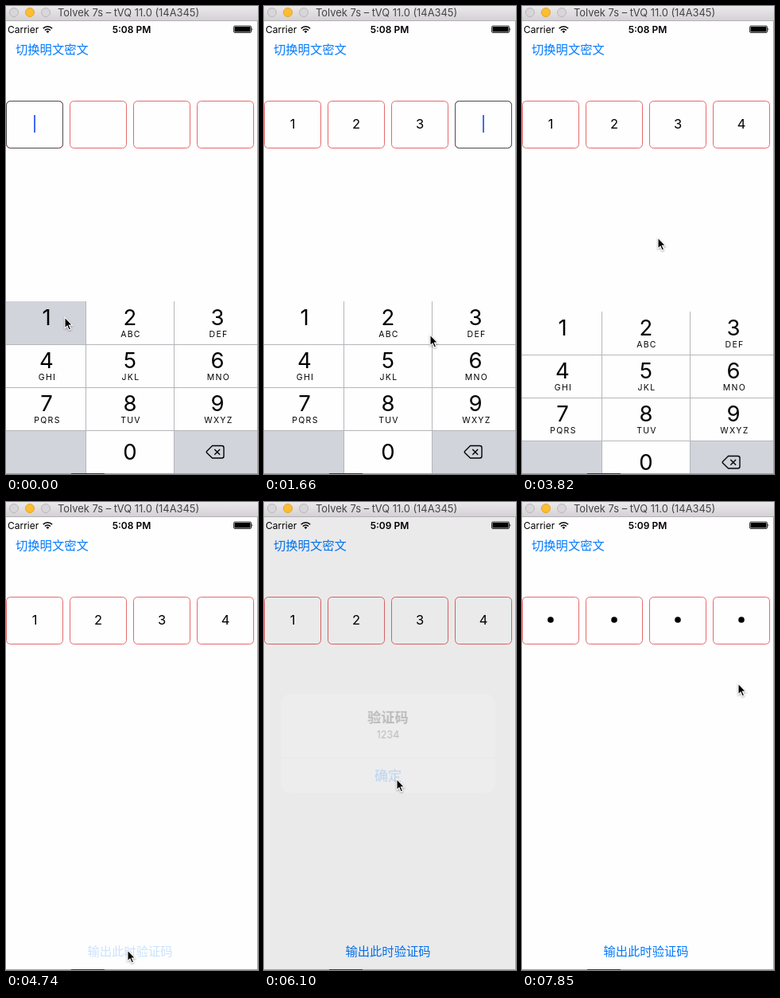
Recreate the animation shown at these times as an HTML page. Size 317 by 588 pixels, loop 8000 ms.

```html
<!DOCTYPE html>
<html lang="zh-CN">
<head>
<meta charset="utf-8">
<title>Code entry</title>
<style>
html, body { margin: 0; width: 100%; height: 100%; overflow: hidden; background: #fefefe; }
svg { display: block; width: 317px; height: 588px; }
text { font-family: Inter, "Noto Sans CJK SC", "Noto Sans CJK JP", "Noto Sans CJK", sans-serif; }
.mid { text-anchor: middle; }
.link { font-size: 15.3px; fill: #007aff; }
.box { fill: none; stroke: #e6686b; }
.active .box { stroke: #4c4c4e; }
.caret { fill: #426bf2; }
.digit { font-size: 16.5px; }
.num { font-size: 27.5px; }
.abc { font-size: 10.5px; letter-spacing: 1.3px; }
.line { stroke: #b4b6ba; fill: none; }
.grey { fill: #d1d4db; }

/* every animation shares the 8 s loop */
.hard, .soft { animation: 8s infinite both; }
.hard { animation-timing-function: step-end; }
.soft { animation-timing-function: linear; }

#key1 { animation-name: first; }
#key2 { animation-name: press2; }
#key3 { animation-name: press3; }
#key4 { animation-name: press4; }
#on1 { animation-name: first; }
#on2 { animation-name: second; }
#on3 { animation-name: third; }
#on4 { animation-name: fourth; }
#d1 { animation-name: digit1; }
#d2 { animation-name: digit2; }
#d3 { animation-name: digit3; }
#d4 { animation-name: digit4; }
#dots { animation-name: dots; }
#time1 { animation-name: before; }
#time2 { animation-name: after; }
#caretA { animation-name: caretA; }
#caretB { animation-name: caretB; }
#toggle { animation-name: toggle; }
#submit { animation-name: submit; }
#pad { animation-name: slide; }
#dim, #alert { animation-name: fade; }
#pop { animation-name: pop; transform-origin: 156px 303px; }
#pointer { animation-name: move; animation-timing-function: ease-in-out; }

@keyframes first { 0% { opacity: 1 } 3.75%, 100% { opacity: 0 } }
@keyframes second { 0% { opacity: 0 } 3.75% { opacity: 1 } 12.625%, 100% { opacity: 0 } }
@keyframes third { 0% { opacity: 0 } 12.625% { opacity: 1 } 20.75%, 100% { opacity: 0 } }
@keyframes fourth { 0% { opacity: 0 } 20.75% { opacity: 1 } 47.75%, 100% { opacity: 0 } }
@keyframes press2 { 0% { opacity: 0 } 8.875% { opacity: 1 } 12.625%, 100% { opacity: 0 } }
@keyframes press3 { 0% { opacity: 0 } 17% { opacity: 1 } 20.75%, 100% { opacity: 0 } }
@keyframes press4 { 0% { opacity: 0 } 27% { opacity: 1 } 28.5%, 100% { opacity: 0 } }
@keyframes digit1 { 0% { opacity: 0 } 3.75% { opacity: 1 } 90.125%, 100% { opacity: 0 } }
@keyframes digit2 { 0% { opacity: 0 } 12.625% { opacity: 1 } 90.125%, 100% { opacity: 0 } }
@keyframes digit3 { 0% { opacity: 0 } 20.75% { opacity: 1 } 90.125%, 100% { opacity: 0 } }
@keyframes digit4 { 0% { opacity: 0 } 28.5% { opacity: 1 } 90.125%, 100% { opacity: 0 } }
@keyframes dots { 0% { opacity: 0 } 90.125%, 100% { opacity: 1 } }
@keyframes before { 0% { opacity: 1 } 75.5%, 100% { opacity: 0 } }
@keyframes after { 0% { opacity: 0 } 75.5%, 100% { opacity: 1 } }
@keyframes caretA { 0% { opacity: 1 } 28.5%, 100% { opacity: 0 } }
@keyframes caretB {
  0%, 28.49% { opacity: 0 }
  28.5%, 34.5% { opacity: 1 }
  36.25%, 40% { opacity: 0 }
  41.75%, 100% { opacity: 1 }
}
@keyframes toggle {
  0%, 89.36% { opacity: 1 }
  89.375%, 90.1% { opacity: .2 }
  92.5%, 100% { opacity: 1 }
}
@keyframes submit {
  0%, 59.24% { opacity: 1 }
  59.25%, 62.99% { opacity: .2 }
  64.5%, 100% { opacity: 1 }
}
@keyframes slide {
  0%, 47.6% { transform: translateY(0); animation-timing-function: cubic-bezier(.3, .4, .3, 1) }
  51.5%, 100% { transform: translateY(217px) }
}
@keyframes fade {
  0%, 62.99% { opacity: 0 }
  63% { opacity: .35 }
  64.5%, 75.45% { opacity: 1 }
  75.5% { opacity: .6 }
  76.25%, 76.95% { opacity: .2 }
  77%, 100% { opacity: 0 }
}
@keyframes pop {
  0%, 63% { transform: scale(1.12) }
  64.5%, 100% { transform: scale(1) }
}
@keyframes move {
  0%, 3.7% { transform: translate(73px, 390px) }
  8.875%, 12.6% { transform: translate(160px, 398px) }
  17%, 20.7% { transform: translate(236px, 404px) }
  20.75%, 21.375% { transform: translate(208px, 412px) }
  27%, 33.7% { transform: translate(52px, 445px) }
  33.75%, 34.5% { transform: translate(74px, 442px) }
  37% { transform: translate(100px, 509px) }
  41.75%, 48.5% { transform: translate(170px, 290px) }
  57%, 67.4% { transform: translate(152px, 562px) }
  71.75%, 77% { transform: translate(166px, 347px) }
  84.25%, 84.8% { transform: translate(67px, 70px) }
  86.375%, 90.5% { transform: translate(63px, 51px) }
  95.125%, 97.3% { transform: translate(212px, 397px) }
  97.375%, 98.05% { transform: translate(240px, 322px) }
  98.125%, 100% { transform: translate(271px, 227px) }
}
</style>
</head>
<body>
<svg viewBox="0 0 317 588" xmlns="http://www.w3.org/2000/svg">
  <defs>
    <linearGradient id="chrome" x2="0" y2="1">
      <stop stop-color="#ebe9eb"/><stop offset="1" stop-color="#d2d0d2"/>
    </linearGradient>
    <rect id="frame" x=".5" y="119.5" width="71" height="59" rx="5"/>
    <rect id="bar" x="35" y="137" width="2" height="22"/>
  </defs>

  <rect width="317" height="588" fill="#fefefe"/>

  <!-- status bar -->
  <text x="2" y="33.5" font-size="12">Carrier</text>
  <g fill="none" stroke="#000" stroke-width="1.6">
    <path d="M46.7 28.2a8 8 0 0 1 11.4 0M48.9 30.5a5 5 0 0 1 7 0"/>
    <path d="M52.4 34l-1.9-2a2.8 2.8 0 0 1 3.8 0z" fill="#000" stroke="none"/>
  </g>
  <g class="mid" font-size="12" font-weight="600">
    <text id="time1" class="hard" x="158" y="33.5">5:08 PM</text>
    <text id="time2" class="hard" x="158" y="33.5">5:09 PM</text>
  </g>
  <rect x="286.5" y="25" width="22" height="8.5" rx="1.5" fill="none" stroke="#000" stroke-width=".8"/>
  <rect x="287.5" y="26" width="20" height="6.5" rx=".6"/>
  <path d="M309.5 27.6q1.8 1.6 0 3.3z"/>

  <text id="toggle" class="link soft" x="12" y="59.8">切换明文密文</text>
  <text id="submit" class="link mid soft" x="156" y="569.8">输出此时验证码</text>

  <!-- code boxes -->
  <g class="box">
    <use href="#frame"/><use href="#frame" x="80"/><use href="#frame" x="160"/><use href="#frame" x="240"/>
  </g>
  <g class="active">
    <g id="on1" class="hard"><use class="box" href="#frame"/><use class="caret" href="#bar"/></g>
    <g id="on2" class="hard"><use class="box" href="#frame" x="80"/><use class="caret" href="#bar" x="80"/></g>
    <g id="on3" class="hard"><use class="box" href="#frame" x="160"/><use class="caret" href="#bar" x="160"/></g>
    <g id="on4" class="hard">
      <use class="box" href="#frame" x="240"/>
      <g id="caretA" class="hard"><use class="caret" href="#bar" x="240"/></g>
      <g id="caretB" class="soft"><use class="caret" href="#bar" x="246"/></g>
    </g>
  </g>
  <g class="digit mid">
    <text id="d1" class="hard" x="36" y="154">1</text>
    <text id="d2" class="hard" x="116" y="154">2</text>
    <text id="d3" class="hard" x="196" y="154">3</text>
    <text id="d4" class="hard" x="276" y="154">4</text>
  </g>
  <g id="dots" class="hard">
    <circle cx="36" cy="148" r="3.8"/><circle cx="116" cy="148" r="3.8"/>
    <circle cx="196" cy="148" r="3.8"/><circle cx="276" cy="148" r="3.8"/>
  </g>

  <!-- number pad -->
  <g id="pad" class="soft">
    <rect y="371" width="317" height="217" fill="#fefefe"/>
    <g class="grey">
      <rect y="534" width="100" height="54"/>
      <rect x="212" y="534" width="105" height="54"/>
      <rect id="key1" class="hard" y="371" width="100" height="54"/>
      <rect id="key2" class="hard" x="101" y="371" width="110" height="54"/>
      <rect id="key3" class="hard" x="212" y="371" width="105" height="54"/>
      <rect id="key4" class="hard" y="426" width="100" height="53"/>
    </g>
    <path class="line" d="M100.5 371V588M211.5 371V588M0 425.5H317M0 479.5H317M0 533.5H317"/>
    <g class="num mid">
      <text x="51" y="401">1</text><text x="156" y="401">2</text><text x="266" y="401">3</text>
      <text x="51" y="455">4</text><text x="156" y="455">5</text><text x="266" y="455">6</text>
      <text x="51" y="509">7</text><text x="156" y="509">8</text><text x="266" y="509">9</text>
      <text x="156" y="570">0</text>
    </g>
    <g class="abc mid">
      <text x="157" y="416">ABC</text><text x="267.5" y="416">DEF</text>
      <text x="52" y="470">GHI</text><text x="157" y="470">JKL</text><text x="267.5" y="470">MNO</text>
      <text x="52" y="524">PQRS</text><text x="157" y="524">TUV</text><text x="267.5" y="524">WXYZ</text>
    </g>
    <path d="M259.5 552.5H271.5Q274 552.5 274 555V565.5Q274 568 271.5 568H259.5L252.5 561.2Q251.8 560.3 252.5 559.4ZM262.3 557l6.8 6.8M269.1 557l-6.8 6.8"
      fill="none" stroke="#000" stroke-width="1.4" stroke-linejoin="round"/>
  </g>

  <!-- alert -->
  <g id="dim" class="soft"><rect y="19" width="317" height="569" opacity=".4"/></g>
  <g id="alert" class="soft">
    <g id="pop" class="soft">
      <rect x="21" y="241" width="270" height="124.5" rx="12.5" fill="#f9f9f9"/>
      <path d="M21 321.5H291" stroke="#dcdce0"/>
      <g class="mid">
        <text x="156" y="277.5" font-size="17.2" font-weight="600">验证码</text>
        <text x="156" y="297" font-size="12.5">1234</text>
        <text x="156" y="350" font-size="17.2" fill="#007aff">确定</text>
      </g>
    </g>
  </g>

  <!-- window -->
  <path d="M316.5 19V588M0 587.5H317" stroke="#a2a2a2"/>
  <path d="M82 587.5H124" stroke="#3a3a3a"/>
  <rect width="317" height="19" fill="url(#chrome)"/>
  <path d="M0 18.5H317" stroke="#b2b0b2"/>
  <g fill="#d8d6d8" stroke="#b9b7b9">
    <circle cx="10" cy="8" r="5.5"/><circle cx="50" cy="8" r="5.5"/>
    <circle cx="30" cy="8" r="5.5" fill="#fdbd2f" stroke="#e2a435"/>
  </g>
  <text x="65" y="13" font-size="12.9" fill="#444">Tolvek 7s – tVQ 11.0 (14A345)</text>

  <g id="pointer" class="soft">
    <path d="M1 1.2V14.8L4 12L6.2 17L8.6 16L6.4 11.1H10.6Z" stroke="#fff" stroke-width="1.1"
      style="filter: drop-shadow(0 1px 1px rgba(0, 0, 0, .35))"/>
  </g>
</svg>
</body>
</html>
```
